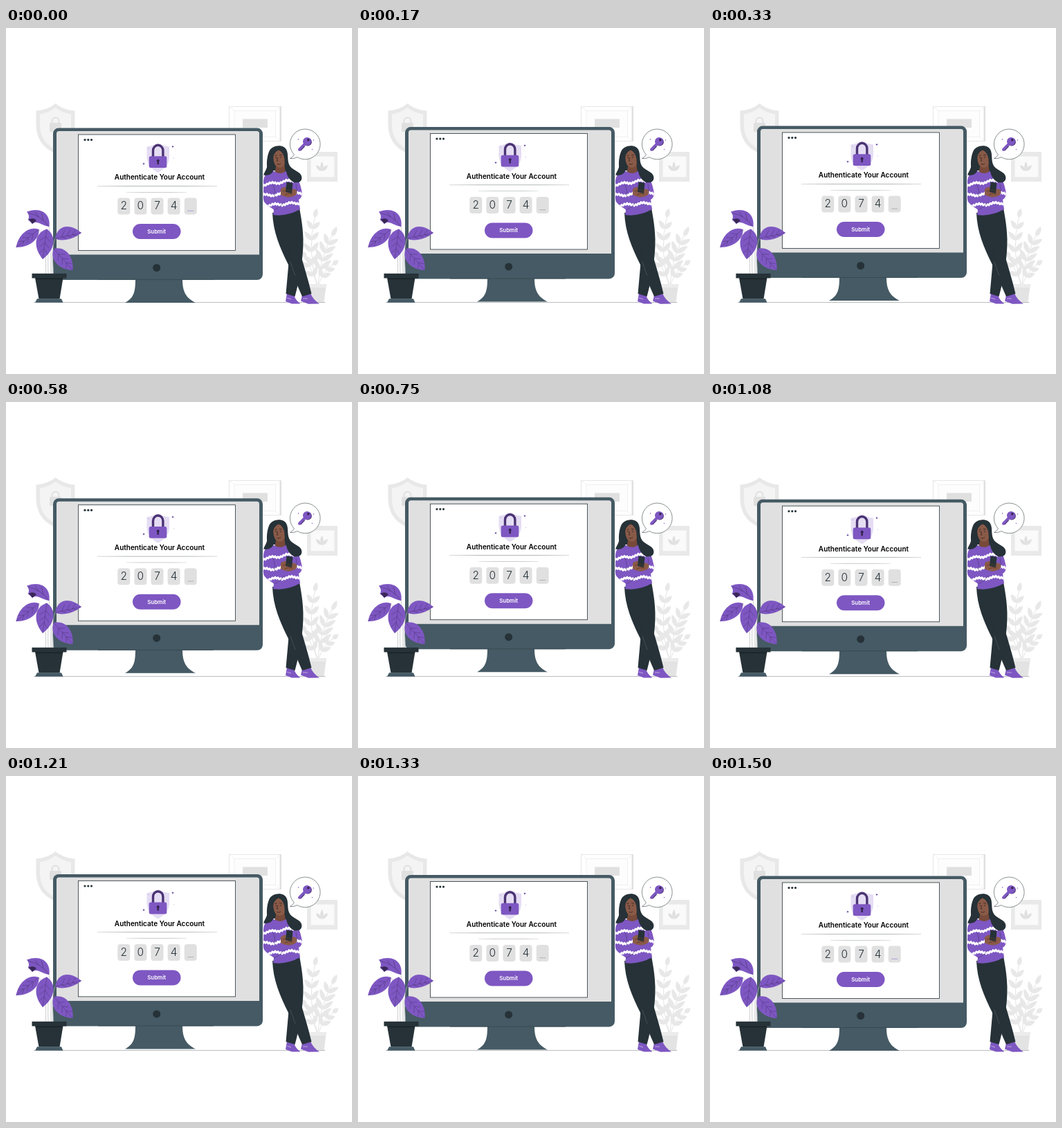
Write an HTML page that moves like this. It is 500 by 500 pixels and loops after 1540 ms.

```html
<!DOCTYPE html>
<html lang="en">
<head>
<meta charset="utf-8">
<title>Authenticate Your Account</title>
<style>
html, body { margin: 0; width: 100%; height: 100%; overflow: hidden; background: #fff; }
svg { display: block; width: 100vw; height: 100vh; }
text { font-family: Inter, "Open Sans", sans-serif; text-anchor: middle; }
</style>
</head>
<body>
<svg viewBox="0 0 500 500">
  <defs>
    <linearGradient id="fade">
      <stop offset="0" stop-color="#263238" stop-opacity=".25"/>
      <stop offset=".25" stop-color="#263238" stop-opacity=".5"/>
      <stop offset=".75" stop-color="#263238" stop-opacity=".5"/>
      <stop offset="1" stop-color="#263238" stop-opacity=".25"/>
    </linearGradient>
    <clipPath id="knit"><use href="#sweater"/></clipPath>
  </defs>

  <!-- wall -->
  <g id="wall">
    <path d="M71.500 109C80 116 90 119 99.500 119.500V140C99 160 88 174 71.500 181C54 174 44 160 43.500 140V119.500C53 119 63 116 71.500 109Z" fill="#e8e8e8"/>
    <path d="M71.500 115C78 120 86 123.500 94 124.500V141C93 158 84 169 71.500 175.500C58 169 49.500 158 49 141V124.500C57 123.500 65 120 71.500 115Z" fill="#f4f4f4"/>
    <path d="M66.500 138V134.500a5 5 0 0 1 10 0V138" fill="none" stroke="#e0e0e0" stroke-width="2"/>
    <rect x="63" y="137" width="17" height="13" rx="1.500" fill="#e0e0e0"/>
    <rect x="322.500" y="113.500" width="75" height="50" fill="#fff" stroke="#e6e6e6"/>
    <path d="M395.500 113.500H398V164H395.500Z" fill="#e0e0e0"/>
    <rect x="330" y="119.500" width="59.500" height="38" fill="#fdfdfd" stroke="#ececec" stroke-width=".8"/>
    <path d="M323 114L330 119.500M396 114L389.500 119.500M396 163L389.500 157.500" stroke="#ececec" stroke-width=".7"/>
    <rect x="342" y="131.500" width="36" height="12.500" fill="#e0e0e0"/>
    <rect x="435" y="179" width="44" height="43" fill="#e9e9e9"/>
    <rect x="440.500" y="185.500" width="34" height="30" fill="#fafafa" stroke="#efefef" stroke-width=".6"/>
    <path d="M456.500 193Q461 199 456.500 207Q452 199 456.500 193ZM448 198Q455 199 456 207Q449 206 448 198ZM465 198Q458 199 457 207Q464 206 465 198Z" fill="#e0e0e0"/>
  </g>
  <g id="shrub"></g>
  <path d="M436 370H463L459.500 396.500H439.500Z" fill="#e3e3e3"/>
  <path d="M436 370H463L462.300 375H436.700Z" fill="#ececec"/>
  <path d="M40 396.600H461.500" stroke="#a5a9ab" stroke-width=".8"/>

  <g id="monitor">
    <path d="M187 363C187 381 185 390 172 397H274C260 390 255 381 255 363Z" fill="#455a64"/>
    <rect x="68" y="144.600" width="303" height="219.400" rx="8" fill="#455a64"/>
    <path d="M133 363.600H300" stroke="#37474f" stroke-width=".8"/>
    <path d="M73 327.500V152.500Q73 149 76.500 149H362.500Q366 149 366 152.500V327.500Z" fill="#e0e0e0"/>
    <rect x="104.500" y="154" width="227" height="167.500" fill="#fff" stroke="#263238" stroke-width=".8"/>
    <g fill="#263238">
      <circle cx="114" cy="161.600" r="1.600"/><circle cx="118.800" cy="161.600" r="1.600"/><circle cx="123.500" cy="161.600" r="1.600"/>
      <circle cx="217.700" cy="346.500" r="5.500"/>
    </g>
    <path d="M219.700 166.500C224 169 230 171 236 171.500V187C235.500 197 229 204 219.700 209C210 204 204 197 203.500 187V171.500C209 171 215 169 219.700 166.500Z" fill="#e5ddf3"/>
    <path d="M212.500 187V177a7.200 7.700 0 0 1 14.400 0V187" fill="none" stroke="#4b3474" stroke-width="3.400"/>
    <rect x="206.700" y="185.200" width="25.600" height="16.800" rx="2.500" fill="#7e57c2"/>
    <path d="M218.600 193.500a2 2 0 1 1 2.200 0L221 197H218.400Z" fill="#32234e"/>
    <path d="M241 169.700l.6 1.100 1.100.6-1.100.6-.6 1.100-.6-1.100-1.100-.6 1.100-.6ZM199 194.500l.6 1.100 1.100.6-1.100.6-.6 1.100-.6-1.100-1.100-.6 1.100-.6Z" fill="#5f3d9c"/>
    <circle cx="242.500" cy="188" r=".7" fill="#cfc2e6"/><circle cx="206" cy="174" r=".7" fill="#bda9de"/>
    <text x="222" y="219.400" font-size="10" font-weight="600" fill="#000">Authenticate Your Account</text>
    <rect x="132" y="228" width="173" height=".7" fill="url(#fade)"/>
    <rect x="174" y="237" width="87" height=".5" fill="url(#fade)"/>
    <g id="code"></g>
    <path id="cursor" d="M262.200 264.300H271.200" stroke-width=".7"/>
    <rect x="183" y="283" width="69.500" height="22" rx="11" fill="#7e57c2"/>
    <text x="217.600" y="296.800" font-size="7.900" font-weight="600" fill="#fff">Submit</text>
  </g>

  <!-- potted plant -->
  <g id="plant">
    <path d="M62 287C67 310 64 335 65 356M47 291C57 300 58 330 57.500 356M60 292C62 315 60 335 61 356M71 304C66 318 67 335 67 356M69 320C65 332 69 340 68.500 356" fill="none" stroke="#b5b8ba" stroke-width=".7"/>
    <path d="M62.500 287C65 271 53 257 30 265.500Q35 271 32 277L38 283C45 277 52 286 62.500 287Z" fill="#7e57c2"/>
    <path d="M32 277Q40 273 44 278L38 283Q35 278 32 277Z" fill="#392755"/>
    <path d="M62 287Q52 272 32 267M54 278L51 267M47 273L42 266" fill="none" stroke="#4b3474" stroke-width=".6"/>
  </g>
  <path d="M42 361H82.500L77.500 391.500H47.500Z" fill="#263238"/>
  <rect x="37.500" y="354.800" width="50" height="6.700" fill="#263238"/>
  <path d="M43 362.300H82" stroke="#172024" stroke-width="1.200"/>
  <path d="M45 391.300H80L82.500 396.800H42Z" fill="#455a64"/>

  <!-- woman -->
  <g>
    <path d="M380 179C383 170 397 167.500 403.500 173.500C409 179 406 190 409 197C412 205 423 206 427 214C429 221 423 225 416 223C408 220 404 213 401 208L388 206L378 205C376 198 377 186 380 179Z" fill="#263238"/>
    <path d="M428 386.500L426 394.500L437 398.800L453 398.500Q444 393 440 383.500ZM406 383.500L404 395L413 398.500H425.500Q418 393 416.500 386.500Z" fill="#7e57c2"/>
    <path d="M406 390L412 392M429 391L436 391" stroke="#d9cdec" stroke-width=".7"/>
    <path d="M385 267C386 295 396 318 408 342L428 388L441.500 384C437 365 431 345 425 325L410 267Z" fill="#263238"/>
    <path d="M398 267C408 300 410 325 408 345L404.500 384L417.500 388C424 365 430 332 429.500 305C429 287 426.500 274 424 260Z" fill="#263238"/>
    <path d="M411 338L418 358" stroke="#516169" stroke-width=".6"/>
    <path d="M391 196L402 194L404 209Q397 216 388.500 208Z" fill="#774a3a"/>
    <path id="sweater" d="M387 207C377 207 372 214 372 222C373 236 370.500 246 373 251C377 257 385 260 387 263L386 270Q405 273 425 262L423 248C428 245 428.500 240 427 234C425 223 420 212 411 208L404 207Q397 213 387 207Z" fill="#7e57c2"/>
    <g id="stripes" clip-path="url(#knit)" fill="none" stroke="#fff" stroke-width="3"></g>
    <path d="M386 226Q390 236 388 245M419 226Q421 234 420 240M388 263Q398 258 402 251" fill="none" stroke="#4b3474" stroke-width=".6"/>
    <path d="M411 203C418 207 426 208 427 215C428 221 423 225 416 223C409 219 406 213 405 207Z" fill="#263238"/>
    <path d="M397 233C402 228 407 230 411 232L418 233Q422 236 419 241C413 246 403 245 397 241Z" fill="#8a5a48"/>
    <path d="M405.500 222.500L414.500 224L413 239L404 237Z" fill="#263238"/>
    <path d="M400 236Q408 233 412 236M403 241Q409 238 414 240" fill="none" stroke="#5f3826" stroke-width=".8"/>
    <path d="M386.500 180C389 174 399 173 402.500 179C405.500 188 404.500 196 400 200.500C396 203.500 391 201 389 198C386.500 194 385.500 187 386.500 180Z" fill="#8a5a48"/>
    <path d="M385.500 186C384 175 390 170 396 170.500C404 171 407 179 406.500 188C406 196 409 202 412 206C405 204 402 197 402.500 190C402 183 398 178 394 176.500C390 178 387.500 182 385.500 186Z" fill="#263238"/>
    <path d="M384 177C378 185 380 196 376 204C374 208 373 210 372 212.500C379 214 385 211 387 205C388.500 199 384.500 190 387 183Z" fill="#263238"/>
    <path d="M388.500 184.500l3-.7M395 183.500l4 .5M392.500 187l-1 5 1.800.2M391.500 196.500q3 1.700 5.500-.7" fill="none" stroke="#2e211d" stroke-width=".8"/>
    <circle cx="390.300" cy="187.300" r=".8" fill="#20262a"/><circle cx="397" cy="187" r=".8" fill="#20262a"/>
  </g>

  <!-- thought bubble -->
  <g>
    <path d="M416.500 183Q414 186.500 410.500 188.600Q417 189 421 186.600A21.800 21.800 0 1 0 416.500 183Z" fill="#fff" stroke="#263238" stroke-width=".55"/>
    <path d="M431.500 168L424 175.700" stroke="#7e57c2" stroke-width="4" stroke-linecap="round"/>
    <path d="M431.500 171L425.500 177.300" stroke="#4b3474" stroke-width="1.100"/>
    <circle cx="436" cy="164.700" r="5.900" fill="#4b3474"/>
    <circle cx="435" cy="164" r="6" fill="#7e57c2"/>
    <circle cx="436.800" cy="161.800" r="1.700" fill="#32234e"/>
    <g fill="#7e57c2"><circle cx="422.500" cy="161" r=".8"/><circle cx="444.500" cy="162" r=".7"/><circle cx="442.500" cy="175.500" r=".7"/></g>
  </g>
</svg>
<script>
const LOOP = 1540, RISE = 6.8, HALF = 750;
const byId = id => document.getElementById(id);
const draw = (id, markup) => byId(id).insertAdjacentHTML("beforeend", markup);

// Leaf from base to tip; a and b are the bulges on either side.
function leaf(x1, y1, x2, y2, a, b, fill) {
  const dx = x2 - x1, dy = y2 - y1, len = Math.hypot(dx, dy);
  const at = (k, side) => `${x1 + dx * k - dy / len * side} ${y1 + dy * k + dx / len * side}`;
  return `<path d="M${x1} ${y1}C${at(.18, a)} ${at(.65, a)} ${x2} ${y2}C${at(.65, -b)} ${at(.18, -b)} ${x1} ${y1}Z" fill="${fill}"/>`;
}

function veined(x1, y1, x2, y2, a, b) {
  const dx = x2 - x1, dy = y2 - y1, len = Math.hypot(dx, dy);
  let veins = `M${x1} ${y1}L${x2} ${y2}`;
  for (const k of [.25, .45, .65]) for (const s of [a, -b]) {
    const w = s * .5 * (1.1 - k * .6), e = k + .16;
    veins += `M${x1 + dx * k} ${y1 + dy * k}L${x1 + dx * e - dy / len * w} ${y1 + dy * e + dx / len * w}`;
  }
  return leaf(x1, y1, x2, y2, a, b, "#7e57c2") +
    `<path d="${veins}" fill="none" stroke="#4b3474" stroke-width=".5"/>`;
}

// Curved twig with leaves in pairs, smaller towards the end.
function twig(p, c, q, pairs, size) {
  const pos = (k, i) => (1 - k) ** 2 * p[i] + 2 * k * (1 - k) * c[i] + k * k * q[i];
  let out = `<path d="M${p}Q${c} ${q}" fill="none" stroke="#dedede" stroke-width=".8"/>`;
  for (let n = 0; n <= pairs; n++) {
    const k = .3 + .7 * n / pairs, x = pos(k, 0), y = pos(k, 1);
    const dir = Math.atan2(y - pos(k - .05, 1), x - pos(k - .05, 0));
    const len = size * (1.15 - .4 * k);
    for (const turn of n < pairs ? [-.7, .7] : [0]) {
      out += leaf(x, y, x + len * Math.cos(dir + turn), y + len * Math.sin(dir + turn), 4.5, 4.5, "#e8e8e8");
    }
  }
  return out;
}

draw("shrub",
  twig([449, 370], [435, 320], [446, 274], 4, 18) +
  twig([451, 370], [453, 335], [471, 301], 4, 21) +
  twig([450, 370], [441, 350], [433, 332], 2, 14) +
  twig([452, 370], [458, 352], [472, 342], 2, 14));

draw("plant",
  veined(47.500, 291, 14.500, 317, 13, 12) +
  veined(59, 290.500, 53, 334, 17, 16) +
  veined(71, 304, 109, 296, 7, 18) +
  veined(69, 319, 96.500, 350, 15, 15));

const digits = "2074";
for (let i = 0; i < 5; i++) {
  const x = 161.300 + 24.100 * i;
  draw("code", `<rect x="${x}" y="245.500" width="18" height="24" rx="4" fill="#e0e0e0"/>` +
    `<text x="${x + 9}" y="262.500" font-size="15.500" font-weight="300" fill="#263238">${digits[i] || ""}</text>`);
}

// Jagged knit bands: height at the left, then the slope.
for (const [y, slope] of [[227, -.15], [242, -.05], [257, -.08]]) {
  let d = "";
  for (let i = 0; i <= 30; i++) {
    const wave = (i % 2 ? .8 : -.8) + 1.300 * Math.sin(i * .55 + y);
    d += `${i ? "L" : "M"}${369 + i * 2} ${y + slope * i * 2 + wave}`;
  }
  draw("stripes", `<path d="${d}"/>`);
}

const monitor = byId("monitor"), cursor = byId("cursor");

function render(t) {
  const lift = Math.max(0, 1 - Math.abs(t / HALF - 1));
  monitor.setAttribute("transform", `translate(0 ${-RISE * lift})`);
  cursor.setAttribute("stroke", lift < .1 ? "#9d80d0" : "#9a9ea0");
}

function tick(now) {
  render(now % LOOP);
  requestAnimationFrame(tick);
}
render(0);
requestAnimationFrame(tick);
</script>
</body>
</html>
```
